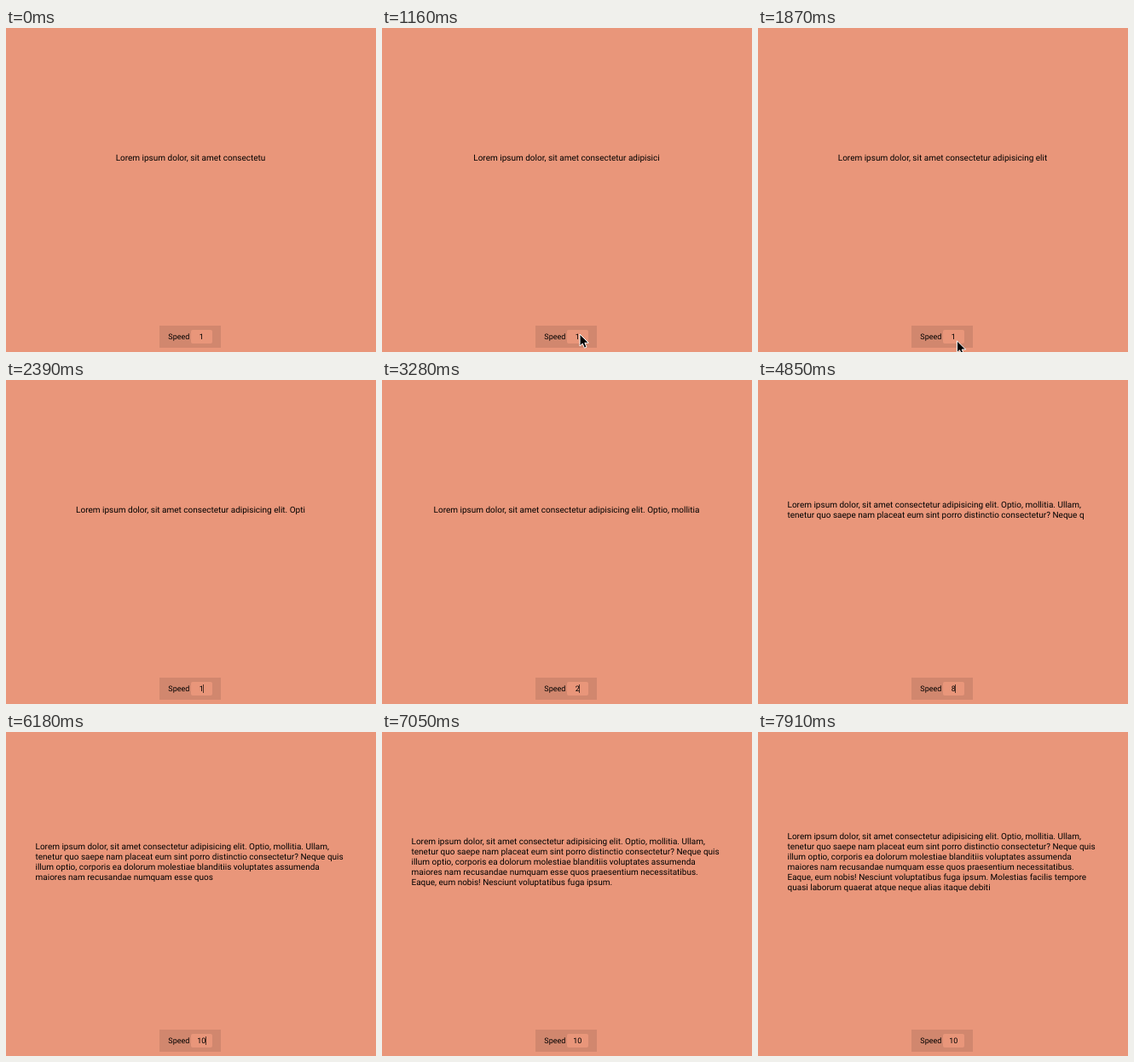
An HTML page for the animation above (7990 ms loop, 434 by 381 pixels).

```html
<!DOCTYPE html>
<html lang="la">
<head>
<meta charset="utf-8">
<title>Typing speed</title>
<style>
  html, body { margin: 0; width: 100%; height: 100%; overflow: hidden; }
  body {
    position: relative;
    background: #e9967a;
    color: #000;
    font-family: Roboto, sans-serif;
    text-rendering: geometricPrecision;
  }
  .stage { position: absolute; left: 0; top: 0; width: 434px; height: 381px; overflow: hidden; }
  .page {
    position: absolute; left: 34.5px; top: 0; width: 364px; height: 308px;
    display: flex; align-items: center; justify-content: center;
    font-size: 10px; line-height: 12px;
  }
  .panel {
    position: absolute; left: 180px; top: 350px; width: 72px; height: 26px;
    background: rgba(0, 0, 0, .1);
    font-size: 9px; line-height: 18px;
  }
  .label { position: absolute; left: 10.3px; top: 5px; }
  .field {
    position: absolute; left: 37px; top: 5px; width: 25px; height: 16px;
    border-radius: 2px; background: #e9967a; text-align: center;
  }
  .value { position: relative; left: -.3px; display: inline-block; }
  .caret {
    position: absolute; left: calc(100% - .6px); top: 3px; width: 1px; height: 10px;
    background: rgba(0, 0, 0, .65);
  }
  .mouse { position: absolute; left: -1px; top: -1px; overflow: visible; }
</style>
</head>
<body>
<div class="stage">
  <div class="page"><div id="text"></div></div>
  <div class="panel">
    <span class="label">Speed</span>
    <div class="field"><span class="value"><span id="value">1</span><i class="caret" id="caret"></i></span></div>
  </div>
  <svg class="mouse" id="mouse" width="14" height="19" viewBox="-1 -1 14 19">
    <path d="M0 0V14L3.2 11L5.4 16.2L8 15.1L5.8 10.2H10.2Z" fill="#000" stroke="#fff"/>
  </svg>
</div>
<script>
const COPY = 'Lorem ipsum dolor, sit amet consectetur adipisicing elit. Optio, mollitia. Ullam, ' +
  'tenetur quo saepe nam placeat eum sint porro distinctio consectetur? Neque quis ' +
  'illum optio, corporis ea dolorum molestiae blanditiis voluptates assumenda ' +
  'maiores nam recusandae numquam esse quos praesentium necessitatibus. ' +
  'Eaque, eum nobis! Nesciunt voluptatibus fuga ipsum. Molestias facilis tempore ' +
  'quasi laborum quaerat atque neque alias itaque debiti';

const LOOP = 7990, STEP = LOOP / 91;      // the screen refreshes in steps
const FIRST = 38.45;                      // characters typed at the start
const FOCUS = 1340, BLINK = 500;
const RAISE = 3005, PRESS = 268, TOP = 10; // speed goes up once per key press
const ENTER = 850, ENTER_TIME = 396, LEAVE = 1780, LEAVE_TIME = 180;

const $ = id => document.getElementById(id);
const text = $('text'), value = $('value'), caret = $('caret'), mouse = $('mouse');
const clamp = x => Math.min(1, Math.max(0, x));

// When a speed is set, and the pause per character at that speed
const setAt = speed => speed === 1 ? 0 : RAISE + (speed - 2) * PRESS;
const pause = speed => Math.max(10.97, 101.5 / speed);

function typed(t) {
  let count = FIRST;
  for (let s = 1; s <= TOP && setAt(s) < t; s++) {
    const end = s < TOP ? Math.min(t, setAt(s + 1)) : t;
    count += (end - setAt(s)) / pause(s);
  }
  return Math.floor(count);
}

function draw(t) {
  text.textContent = COPY.slice(0, typed(t));

  const speed = t < RAISE ? 1 : Math.min(TOP, 2 + Math.floor((t - RAISE) / PRESS));
  value.textContent = speed;

  // Every new value restarts the caret blink
  const age = t - Math.max(FOCUS, setAt(speed));
  caret.style.visibility = age >= 0 && age % (2 * BLINK) < BLINK ? 'visible' : 'hidden';

  // The pointer rises to the field, rests and drops out again
  const away = 1 - clamp((t - ENTER) / ENTER_TIME) + clamp((t - LEAVE) / LEAVE_TIME);
  mouse.style.visibility = away < 1 ? 'visible' : 'hidden';
  mouse.style.transform = `translate(${231 + 5 * away}px, ${354 + 29 * away}px)`;
}

let last = -1;
function loop() {
  const step = Math.floor(performance.now() % LOOP / STEP);
  if (step !== last) draw(((last = step) + .25) * STEP);
  requestAnimationFrame(loop);
}
loop();
</script>
</body>
</html>
```
